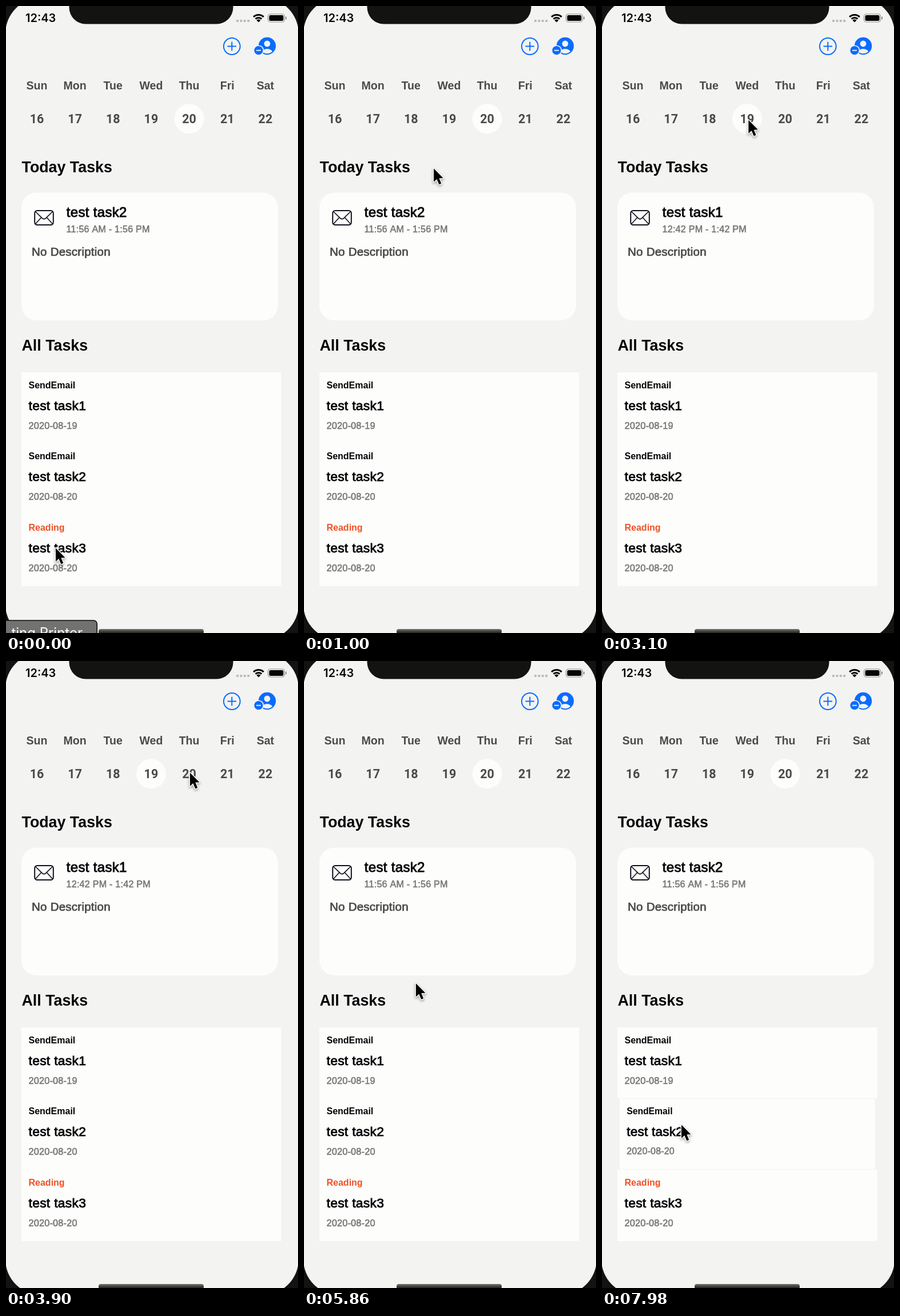
An HTML page with a canvas that plays this animation: 511 px wide and 1097 px high, repeating every 8 s.

```html
<!DOCTYPE html>
<html lang="en">
<head>
<meta charset="utf-8">
<title>Task planner</title>
<style>
html, body { margin: 0; width: 100%; height: 100%; overflow: hidden; background: #000; }
canvas { display: block; width: 511px; height: 1097px; }
</style>
</head>
<body>
<canvas id="stage"></canvas>
<script>
const W = 511, H = 1097, LOOP = 8000;
const BG = '#f3f3f1', CARD = '#fdfdfc', BLUE = '#0a6cff', BEZEL = '#131311';
const INK = '#050508', DIM = '#4a4a4a', GRAY = '#777776';
const SANS = '"Liberation Sans", Arial, sans-serif';
const DAYS = ['Sun', 'Mon', 'Tue', 'Wed', 'Thu', 'Fri', 'Sat'];
const ROWS = [
  { kind: 'SendEmail', color: INK, name: 'test task1', date: '2020-08-19' },
  { kind: 'SendEmail', color: INK, name: 'test task2', date: '2020-08-20' },
  { kind: 'Reading', color: '#ee5226', name: 'test task3', date: '2020-08-20' }
];
const CARDS = {
  3: { name: 'test task1', time: '12:42 PM - 1:42 PM' },
  4: { name: 'test task2', time: '11:56 AM - 1:56 PM' }
};
// Pointer stops: time, x, y
const POINTER = [
  [0, 86, 946], [20, 86, 946], [400, 158, 580], [820, 217, 318], [1000, 226, 282],
  [1100, 230, 268], [1560, 244, 208], [2120, 248, 196], [2950, 248, 196],
  [3240, 267, 198], [3900, 321, 193], [4950, 321, 193], [5300, 303, 240],
  [5600, 250, 390], [5860, 195, 561], [5920, 189, 592], [6240, 156, 745],
  [6600, 138, 809], [8000, 138, 809]
];
const PICK_WED = 2500, PICK_THU = 4420, PRESS = [7420, 7980];

const canvas = document.getElementById('stage');
const ctx = canvas.getContext('2d');
const ratio = window.devicePixelRatio || 1;
canvas.width = Math.round(W * ratio);
canvas.height = Math.round(H * ratio);

const clamp = v => Math.max(0, Math.min(1, v));
const smooth = v => v * v * (3 - 2 * v);

// Monotone cubic through the pointer stops
function track(t, axis) {
  const p = POINTER;
  let i = 0;
  while (i < p.length - 2 && t >= p[i + 1][0]) i++;
  const slope = k => k < 0 || k > p.length - 2 ? 0
    : (p[k + 1][axis] - p[k][axis]) / (p[k + 1][0] - p[k][0]);
  const tangent = k => {
    const a = slope(k - 1), b = slope(k);
    return a * b <= 0 ? 0 : 2 * a * b / (a + b);
  };
  const span = p[i + 1][0] - p[i][0], u = (t - p[i][0]) / span;
  const u2 = u * u, u3 = u2 * u;
  return (2 * u3 - 3 * u2 + 1) * p[i][axis] + (3 * u2 - 2 * u3) * p[i + 1][axis]
    + ((u3 - 2 * u2 + u) * tangent(i) + (u3 - u2) * tangent(i + 1)) * span;
}

function rounded(x, y, w, h, r, fill) {
  ctx.beginPath();
  ctx.roundRect(x, y, w, h, r);
  if (fill) { ctx.fillStyle = fill; ctx.fill(); }
}

function disc(x, y, r, fill) {
  ctx.beginPath();
  ctx.arc(x, y, r, 0, 7);
  ctx.fillStyle = fill;
  ctx.fill();
}

function line(points, color, width) {
  ctx.beginPath();
  points.forEach(([x, y], i) => i ? ctx.lineTo(x, y) : ctx.moveTo(x, y));
  ctx.strokeStyle = color;
  ctx.lineWidth = width;
  ctx.stroke();
}

function text(str, x, y, font, color, align = 'left') {
  ctx.font = font;
  ctx.textAlign = align;
  ctx.fillStyle = color;
  ctx.fillText(str, x, y);
}

const bold = (str, x, y, size, color, align) =>
  text(str, x, y, `bold ${size}px ${SANS}`, color, align);

// Regular weight thickened by a thin outline and slightly tracked
function medium(str, x, y, size, color) {
  ctx.letterSpacing = `${size * 0.012}px`;
  text(str, x, y, `${size}px ${SANS}`, color);
  ctx.strokeStyle = color;
  ctx.lineWidth = size * 0.036;
  ctx.strokeText(str, x, y);
  ctx.letterSpacing = '0px';
}

function statusBar() {
  rounded(110.5, -40, 287, 71.5, 29, BEZEL);
  text('12:43', 34, 28, '600 20px Inter, sans-serif', INK);
  for (let i = 0; i < 4; i++) rounded(403 + i * 6.4, 24, 4, 4, 1, '#bcbbb4');

  ctx.strokeStyle = INK;
  ctx.lineWidth = 3;
  for (const r of [12.5, 7.6]) {
    ctx.beginPath();
    ctx.arc(442, 28, r, -Math.PI * 0.75, -Math.PI * 0.25);
    ctx.stroke();
  }
  ctx.beginPath();
  ctx.moveTo(442, 28.5);
  ctx.arc(442, 28.5, 5, -Math.PI * 0.75, -Math.PI * 0.25);
  ctx.fillStyle = INK;
  ctx.fill();

  rounded(458.5, 14, 29, 14, 4.2);
  ctx.strokeStyle = '#92928e';
  ctx.lineWidth = 1.2;
  ctx.stroke();
  rounded(460.5, 16, 25, 10, 2.5, INK);
  rounded(489, 18.5, 2, 5, 1, '#92928e');
}

function toolbar() {
  ctx.beginPath();
  ctx.arc(395.3, 70.5, 14.4, 0, 7);
  ctx.strokeStyle = BLUE;
  ctx.lineWidth = 2;
  ctx.stroke();
  line([[387.5, 70.5], [403, 70.5]], BLUE, 2);
  line([[395.3, 62.7], [395.3, 78.3]], BLUE, 2);

  disc(457, 70, 15.2, BLUE);
  ctx.save();
  ctx.beginPath();
  ctx.arc(457, 70, 13.2, 0, 7);
  ctx.clip();
  ctx.beginPath();
  ctx.ellipse(457, 82.5, 10, 7.5, 0, 0, 7);
  ctx.fillStyle = BG;
  ctx.fill();
  ctx.restore();
  disc(457, 66, 5.4, BG);
  disc(442, 77.7, 9.3, BG);
  disc(442, 77.7, 7.6, BLUE);
  line([[438, 77.7], [446, 77.7]], BG, 1.8);
}

function week(day) {
  const at = i => 54 + i * 66.65;
  disc(at(day), 197.3, 26, CARD);
  DAYS.forEach((name, i) => {
    bold(name, at(i), 146, 19.6, DIM, 'center');
    text(16 + i, at(i), 204.5, 'bold 21.5px Roboto, sans-serif', DIM, 'center');
  });
}

function envelope() {
  rounded(50.2, 358, 32.6, 25, 4.5);
  ctx.strokeStyle = '#10101c';
  ctx.lineWidth = 2;
  ctx.stroke();
  ctx.lineWidth = 1.6;
  ctx.beginPath();
  ctx.moveTo(51.3, 359.5);
  ctx.lineTo(63.5, 371.3);
  ctx.quadraticCurveTo(66.5, 374, 69.5, 371.3);
  ctx.lineTo(81.7, 359.5);
  ctx.moveTo(51.3, 381.5);
  ctx.lineTo(61.8, 370);
  ctx.moveTo(81.7, 381.5);
  ctx.lineTo(71.2, 370);
  ctx.stroke();
}

function todayCard(task) {
  bold('Today Tasks', 27.5, 291, 26.8, INK);
  rounded(27, 326.5, 449, 223.5, 26, CARD);
  envelope();
  medium(task.name, 105.8, 368.7, 24.1, INK);
  medium(task.time, 105.5, 396, 16.2, GRAY);
  medium('No Description', 45, 437, 20.5, DIM);
}

function taskList(scale) {
  bold('All Tasks', 27.5, 603, 26.8, INK);
  ROWS.forEach((row, i) => {
    const top = Math.round(640.7 + i * 124.6);
    const height = Math.round(640.7 + (i + 1) * 124.6) - top;
    ctx.save();
    if (i === 1) {
      const cx = 254.2, cy = top + height / 2;
      ctx.translate(cx, cy);
      ctx.scale(scale, scale);
      ctx.translate(-cx, -cy);
    }
    ctx.fillStyle = CARD;
    ctx.fillRect(27, top, 454.5, height);
    bold(row.kind, 39.5, top + 27.8, 16, row.color);
    medium(row.name, 39.5, top + 66, 22.9, INK);
    medium(row.date, 39.5, top + 99, 16.3, GRAY);
    ctx.restore();
  });
}

function homeBar() {
  const shade = ctx.createLinearGradient(0, 1090, 0, 1098);
  shade.addColorStop(0, '#77776f');
  shade.addColorStop(0.5, '#44443e');
  shade.addColorStop(1, '#1c1c18');
  rounded(162, 1090, 184, 9, 4, shade);
}

function hint(alpha) {
  if (alpha <= 0) return;
  ctx.save();
  ctx.globalAlpha = alpha;
  rounded(-12, 1075, 171.3, 40, 6, '#727270');
  ctx.strokeStyle = '#0b0b0d';
  ctx.lineWidth = 1.6;
  ctx.stroke();
  text('ting Printer', 134, 1105, '24px Inter, sans-serif', '#fff', 'right');
  ctx.restore();
}

function pointer(x, y) {
  ctx.save();
  ctx.translate(x + 1, y + 2.5);
  ctx.scale(0.92, 0.92);
  ctx.beginPath();
  [[0, 0], [0, 25.5], [5.8, 20.2], [10.2, 30.3], [14.4, 28.5], [10.2, 18.6], [18, 18.2]]
    .forEach(([px, py]) => ctx.lineTo(px, py));
  ctx.closePath();
  ctx.lineJoin = 'round';
  ctx.strokeStyle = '#fff';
  ctx.lineWidth = 3;
  ctx.shadowColor = 'rgba(0,0,0,.4)';
  ctx.shadowBlur = 4 * ratio;
  ctx.shadowOffsetY = 2 * ratio;
  ctx.stroke();
  ctx.shadowColor = 'transparent';
  ctx.fillStyle = '#000';
  ctx.fill();
  ctx.restore();
}

function draw(t) {
  const day = t >= PICK_WED && t < PICK_THU ? 3 : 4;
  const press = smooth(clamp((t - PRESS[0]) / (PRESS[1] - PRESS[0])));
  ctx.setTransform(ratio, 0, 0, ratio, 0, 0);
  ctx.fillStyle = BEZEL;
  ctx.fillRect(0, 0, W, H);
  rounded(-1, -14, 513, 1123, 62, BG);
  statusBar();
  toolbar();
  week(day);
  todayCard(CARDS[day]);
  taskList(1 - 0.017 * press);
  homeBar();
  hint(1 - clamp((t - 20) / 200));
  pointer(track(t, 1), track(t, 2));
}

const start = performance.now();
function tick() {
  draw((performance.now() - start) % LOOP);
  requestAnimationFrame(tick);
}
draw(0);
requestAnimationFrame(tick);
</script>
</body>
</html>
```
